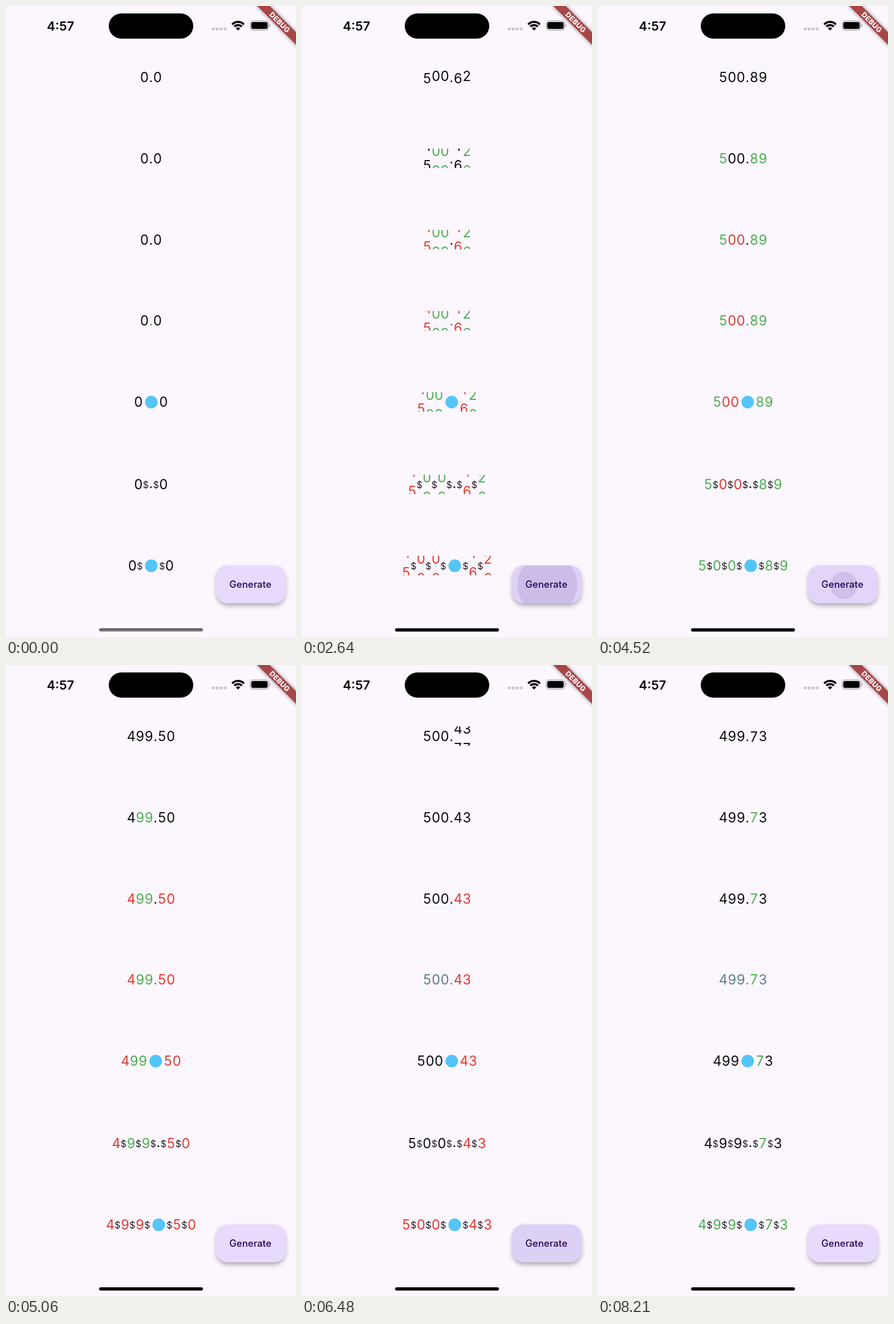
Animation of 508x1102 px, one loop 8330 ms. Source, as an HTML page:

```html
<!DOCTYPE html>
<html lang="en">
<head>
<meta charset="utf-8">
<title>Rolling digits</title>
<style>
  html, body { margin: 0; width: 100%; height: 100%; overflow: hidden; background: #fcf6fe; }
  svg { display: block; width: 100%; height: 100%; }
  text { font-family: Inter, "Open Sans", sans-serif; text-anchor: middle; }
  #rows { font-size: 23.6px; }
  #rows .unit { font-size: 16px; fill: #1b1a1e; }
</style>
</head>
<body>
<svg viewBox="0 0 508 1102">
  <defs>
    <linearGradient id="dim" x2="0" y2="1">
      <stop offset="0" stop-color="#565159"/>
      <stop offset="1" stop-color="#8a858d"/>
    </linearGradient>
    <filter id="lift" x="-20%" y="-20%" width="140%" height="150%">
      <feGaussianBlur stdDeviation="4"/>
    </filter>
    <filter id="soft" x="-20%" y="-60%" width="140%" height="220%">
      <feGaussianBlur stdDeviation="3"/>
    </filter>
    <clipPath id="face"><rect x="368" y="977" width="122" height="66" rx="20"/></clipPath>
  </defs>

  <rect width="508" height="1102" fill="#fcf6fe"/>

  <text x="95.5" y="42.5" font-size="22" font-weight="600">4:57</text>
  <rect x="180" y="13" width="148" height="44" rx="22"/>
  <g fill="#cac4cd">
    <rect x="360.5" y="37.8" width="5" height="4.6" rx="1.4"/>
    <rect x="367.5" y="37.8" width="5" height="4.6" rx="1.4"/>
    <rect x="374.5" y="37.8" width="5" height="4.6" rx="1.4"/>
    <rect x="381.5" y="37.8" width="5" height="4.6" rx="1.4"/>
  </g>
  <g fill="none" stroke="#000" stroke-width="3.7">
    <path d="M396.2 32.2A14.2 14.2 0 0 1 416.8 32.2"/>
    <path d="M400 36.1A8.9 8.9 0 0 1 413 36.1"/>
  </g>
  <path d="M406.5 42.7L402.7 38.9A5.4 5.4 0 0 1 410.3 38.9Z"/>
  <rect x="427.7" y="26.2" width="32.6" height="15.8" rx="5" fill="none" stroke="#a7a2aa" stroke-width="1.3"/>
  <rect x="429.6" y="28.1" width="28.8" height="12" rx="3.3"/>
  <path d="M461.6 31.4Q463.6 32.3 463.6 34.1T461.6 36.8Z" fill="#a7a2aa"/>

  <g id="rows"></g>

  <rect x="369" y="982" width="120" height="65" rx="20" fill="#000" opacity=".33" filter="url(#lift)"/>
  <rect x="368" y="977" width="122" height="66" rx="20" fill="#e7dafd"/>
  <g clip-path="url(#face)" fill="#21005d">
    <rect id="glow" x="368" y="977" width="122" height="66"/>
    <circle id="ripple"/>
  </g>
  <text x="428.2" y="1016" font-size="16.6" font-weight="500" letter-spacing=".1" fill="#21005d">Generate</text>

  <rect id="home" x="163" y="1086.8" width="182" height="5.6" rx="2.8"/>

  <g transform="translate(508 0) rotate(45)">
    <rect x="-51" y="32.6" width="102" height="15.2" opacity=".5" filter="url(#soft)"/>
    <rect x="-51" y="32.6" width="102" height="15.2" fill="#a94547"/>
    <text y="44.8" font-size="12.6" font-weight="800" letter-spacing=".2" fill="#fff">DEBUG</text>
  </g>
</svg>

<script>
const LOOP = 8330, SLOT = 34;
const DIGIT_W = 15.5, DOT_W = 7.5, UNIT_W = 10.5, ICON_W = 28.5;
const BLACK = '#0d0c0f', GREEN = '#4caf50', RED = '#e33b33', GREY = '#607d8b';

// Each tap: finger down, finger up, number shown afterwards.
const taps = [
  [1760, 1860, '500.62'], [2420, 2560, '499.16'], [3480, 3600, '500.89'], [4450, 4560, '499.50'],
  [5240, 5360, '500.77'], [6030, 6180, '500.43'], [6600, 6866, '499.33'], [7730, 7820, '499.73']
].map(([down, up, value]) => ({ down, up, value }));

const rows = [
  { y: 124.2, time: 400, up: BLACK, down: BLACK },
  { y: 266.1, up: GREEN, down: BLACK },
  { y: 408, up: GREEN, down: RED },
  { y: 549.8, up: GREEN, down: RED, same: GREY },
  { y: 691.4, up: GREEN, down: RED, icon: true },
  { y: 835.6, up: GREEN, down: RED, unit: true },
  { y: 977.3, up: GREEN, down: RED, icon: true, unit: true, whole: true }
];

const $ = id => document.getElementById(id);
const clamp = v => Math.max(0, Math.min(1, v));

function bezier(x1, y1, x2, y2) {
  const at = (a, b, s) => 3 * a * s * (1 - s) ** 2 + 3 * b * s * s * (1 - s) + s ** 3;
  return x => {
    let lo = 0, hi = 1;
    for (let i = 0; i < 22; i++) {
      const mid = (lo + hi) / 2;
      if (at(x1, x2, mid) < x) lo = mid; else hi = mid;
    }
    return x <= 0 ? 0 : x >= 1 ? 1 : at(y1, y2, hi);
  };
}
const easeIn = bezier(.42, 0, 1, 1);
const ease = bezier(.25, .1, .25, 1);

const label = (x, y, s, extra) => `<text x="${x}" y="${y.toFixed(2)}" ${extra}>${s}</text>`;

// Character of the earlier number in the same decimal place.
function oldChar(from, to, i) {
  return from[i - to.indexOf('.') + from.indexOf('.')] || '';
}

function drawRow(row, index, from, to, age) {
  const p = easeIn(clamp(age / (row.time || 150)));
  const digits = to.length - 1;
  const units = row.unit ? digits : 0;
  const midW = row.icon ? ICON_W : DOT_W;
  const base = row.y + 8.6;
  let x = 254 - (digits * DIGIT_W + units * UNIT_W + midW) / 2;
  let out = '';
  for (let i = 0; i < to.length; i++) {
    if (i && row.unit) {
      out += label(x + UNIT_W / 2, row.y + 6.2, '$', 'class="unit"');
      x += UNIT_W;
    }
    const c = to[i], w = c === '.' ? midW : DIGIT_W, cx = x + w / 2;
    x += w;
    if (c === '.') {
      out += row.icon
        ? `<circle cx="${cx + .5}" cy="${row.y + .3}" r="11" fill="#54c5f8"/>`
        : label(cx, base - (row.unit ? 2 : 0), c, `fill="${row.same || BLACK}"`);
      continue;
    }
    const old = from ? oldChar(from, to, i) : c;
    const diff = c - (old || 0);
    const trend = row.whole && from ? to - from : diff;
    const color = !from ? BLACK : trend > 0 ? row.up : trend < 0 ? row.down : row.same || BLACK;
    const fill = `fill="${color}"`;
    if (!diff || p === 1) {
      out += label(cx, base, c, fill);
    } else {
      const dir = Math.sign(diff);
      out += label(cx, base - dir * SLOT * p, old, fill);
      out += label(cx, base + dir * SLOT * (1 - p), c, fill);
    }
  }
  return `<clipPath id="slot${index}"><rect x="100" y="${row.y - SLOT / 2}" width="308" height="${SLOT}"/></clipPath>`
    + `<g clip-path="url(#slot${index})">${out}</g>`;
}

function drawButton(t) {
  const tap = taps.filter(a => a.down <= t).pop();
  let alpha = 0, glow = 0;
  if (tap) {
    const held = Math.min(t, tap.up) - tap.down, after = t - tap.up;
    const k = ease(clamp(held / 1000 + Math.max(0, after) / 420));
    const ripple = $('ripple');
    ripple.setAttribute('cx', 431 - 2 * k);
    ripple.setAttribute('cy', 1012 - 2 * k);
    ripple.setAttribute('r', 20.8 + 55 * k);
    alpha = .097 * clamp((t - tap.down + 15) / 75) * clamp((375 - after) / 150);
    glow = .07 * clamp((t - tap.down) / 200) * clamp((200 - after) / 200);
  }
  $('ripple').setAttribute('opacity', alpha);
  $('glow').setAttribute('opacity', glow);
  $('home').setAttribute('fill', tap ? '#000' : 'url(#dim)');
}

let shown = '';
function draw(t) {
  const n = taps.filter(a => a.up <= t).length;
  const to = n ? taps[n - 1].value : '0.0';
  const from = n > 1 ? taps[n - 2].value : n ? '0.0' : null;
  const age = n ? t - taps[n - 1].up : 0;
  const key = n + ':' + Math.min(age, 400);
  if (key !== shown) {
    $('rows').innerHTML = rows.map((r, i) => drawRow(r, i, from, to, age)).join('');
    shown = key;
  }
  drawButton(t);
}

const start = performance.now();
function tick() {
  draw((performance.now() - start) % LOOP);
  requestAnimationFrame(tick);
}
tick();
</script>
</body>
</html>
```
